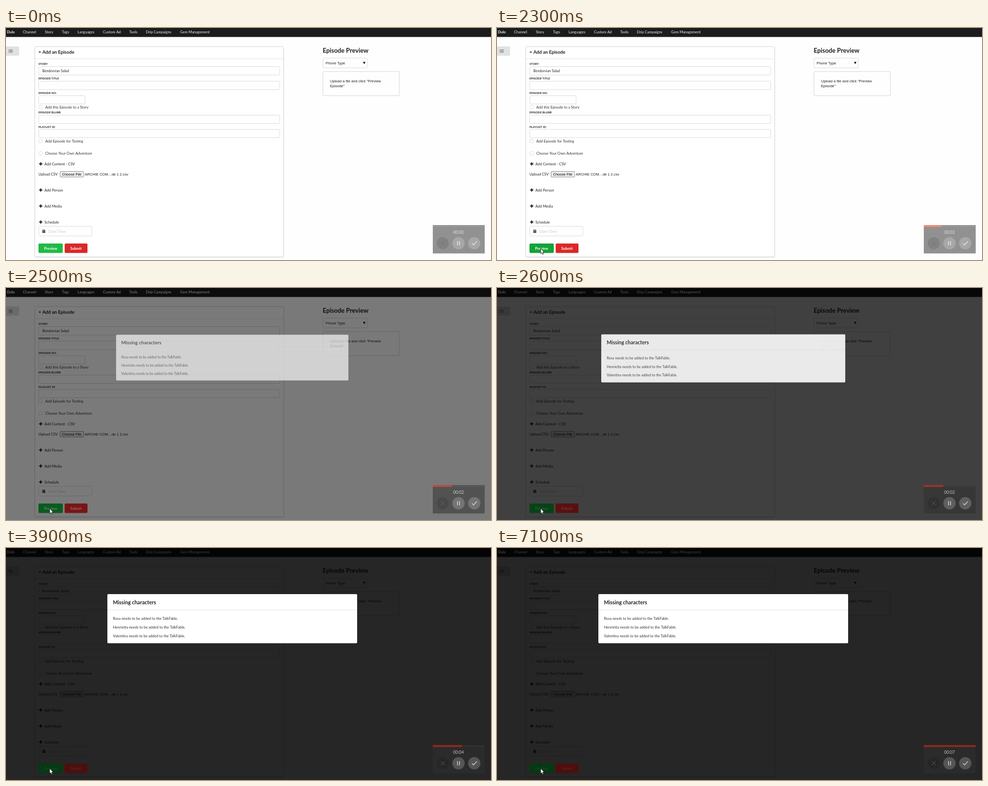
Recreate the animation shown at these times as an HTML page with a canvas. Size 1000 by 478 pixels, loop 7200 ms.

```html
<!DOCTYPE html>
<html lang="en">
<head>
<meta charset="utf-8">
<title>Add an Episode</title>
<style>
html, body { margin: 0; width: 100%; height: 100%; overflow: hidden; background: #fff; }
canvas { display: block; width: 100vw; height: 100vh; }
</style>
</head>
<body>
<canvas id="stage"></canvas>
<script>
const W = 1000, H = 478, LOOP = 7200, STEP = 100;
const LATO = 'Lato, sans-serif';
const ARIAL = '"Liberation Sans", Arial, sans-serif';
const INK = '#222', LINE = '#d9dadb', BASE = 7.52;

const canvas = document.getElementById('stage');
const ctx = canvas.getContext('2d');
const dpr = window.devicePixelRatio || 1;
canvas.width = W * dpr;
canvas.height = H * dpr;

// Piecewise linear value; keys are [time, value] pairs.
function track(keys, t) {
  if (t <= keys[0][0]) return keys[0][1];
  for (let i = 1; i < keys.length; i++) {
    const [t0, v0] = keys[i - 1], [t1, v1] = keys[i];
    if (t <= t1) return v0 + (v1 - v0) * (t - t0) / (t1 - t0);
  }
  return keys[keys.length - 1][1];
}

// cy is the middle of the capital letters.
function text(str, x, cy, { size = BASE, weight = 400, font = LATO, color = INK, align = 'left' } = {}) {
  ctx.font = `${weight} ${size}px ${font}`;
  ctx.fillStyle = color;
  ctx.textAlign = align;
  ctx.fillText(str, x, cy + size * 0.36);
}

function rect(x, y, w, h, color) {
  ctx.fillStyle = color;
  ctx.fillRect(x, y, w, h);
}

function box(x, y, w, h, { r = 2, fill, stroke } = {}) {
  ctx.beginPath();
  ctx.roundRect(x, y, w, h, r);
  if (fill) { ctx.fillStyle = fill; ctx.fill(); }
  if (stroke) { ctx.strokeStyle = stroke; ctx.lineWidth = 1; ctx.stroke(); }
}

function disc(x, y, r, fill) {
  ctx.beginPath();
  ctx.arc(x, y, r, 0, 7);
  ctx.fillStyle = fill;
  ctx.fill();
}

function lines(points, color, width) {
  ctx.beginPath();
  points.forEach(([x, y, move], i) => i && !move ? ctx.lineTo(x, y) : ctx.moveTo(x, y));
  ctx.strokeStyle = color;
  ctx.lineWidth = width;
  ctx.stroke();
}

const NAV = [['Channel', 35], ['Story', 80], ['Tags', 115.5], ['Languages', 147.5],
  ['Custom Ad', 200], ['Tools', 254], ['Drip Campaigns', 288.5], ['Gem Management', 359]];

function navText(color) {
  text('Dulo', 2, 8, { weight: 700, color });
  for (const [label, x] of NAV) text(label, x, 8, { color });
}

function buttons(hover) {
  box(67, 444, 50, 19.5, { fill: hover ? '#12a337' : '#21ba45' });
  box(121, 444, 47, 19.5, { fill: '#db2828' });
}

function radio(label, y) {
  ctx.beginPath();
  ctx.arc(71.2, y, 4, 0, 7);
  ctx.strokeStyle = '#d4d4d5';
  ctx.lineWidth = 0.8;
  ctx.stroke();
  text(label, 81, y + 0.3, { color: '#333' });
}

function plusRow(label, y) {
  rect(68.2, y - 1, 6.8, 1.9, '#111');
  rect(70.65, y - 3.4, 1.9, 6.8, '#111');
  text(label, 79.3, y + 0.2);
}

function field(label, labelY, y, w, h = 17.5) {
  text(label, 67, labelY, { size: 6, weight: 700 });
  box(67.5, y + 0.5, w, h, { stroke: LINE });
}

function form(hover) {
  ctx.save();
  ctx.shadowColor = 'rgba(34,36,38,.15)';
  ctx.shadowBlur = 2 * dpr;
  ctx.shadowOffsetY = dpr;
  box(59.5, 38.5, 513, 433, { fill: '#fff' });
  ctx.restore();
  box(59.5, 38.5, 513, 433, { stroke: '#d4d4d5' });
  rect(60, 63, 512, 1, '#e3e4e4');
  text('+ Add an Episode', 67, 49.3, { size: 9.6, weight: 700 });

  field('STORY', 74.3, 79, 497);
  text('Bendorvian Salad', 75, 88.3, { size: 7.2 });
  field('EPISODE TITLE', 104, 109, 497);
  field('EPISODE NO.', 133.8, 139, 95.5, 17);
  radio('Add this Episode to a Story', 163.2);
  field('EPISODE BLURB', 173.6, 179, 497, 17);
  field('PLAYLIST ID', 203.4, 208.5, 497, 17);
  radio('Add Episode for Testing', 233);
  radio('Choose Your Own Adventure', 258.2);

  plusRow('Add Content - CSV', 280);
  text('Upload CSV', 67, 301);
  box(111.5, 295.5, 48.5, 11.5, { r: 1, fill: '#efefef', stroke: '#8a8a8a' });
  text('Choose File', 115.5, 301, { size: 7.5, font: ARIAL, color: '#000' });
  text('ARCHIE COM…de 1 2.csv', 162.5, 301, { size: 7.5, font: ARIAL });
  plusRow('Add Person', 333.8);
  plusRow('Add Media', 366.8);
  plusRow('Schedule', 399.8);

  box(67.5, 408.5, 109.5, 20, { stroke: LINE });
  rect(74.7, 416.2, 6.4, 6, '#555');
  rect(74.7, 417.6, 6.4, 0.6, '#ccc');
  rect(75.8, 415, 1.2, 1.8, '#555');
  rect(78.8, 415, 1.2, 1.8, '#555');
  text('Date/Time', 87.5, 419.2, { color: '#c9c9c9' });

  buttons(hover);
  const label = { weight: 700, color: '#fff', align: 'center' };
  text('Preview', 92, 453.8, label);
  text('Submit', 144.3, 453.8, label);
}

function page(hover) {
  rect(0, 0, W, H, '#fefefe');
  rect(0, 0, W, 18.5, '#1b1c1d');
  navText('rgba(255,255,255,.95)');

  box(-4, 38, 31, 19, { fill: '#e0e1e2' });
  for (let y = 44.5; y < 51; y += 2.5) {
    rect(5.3, y, 1.4, 1.1, '#555');
    rect(7.5, y, 6, 1.1, '#666');
  }

  form(hover);

  text('Episode Preview', 653, 46, { size: 12.85, weight: 700 });
  box(653.5, 62, 91.5, 20, { stroke: LINE });
  const sans = { size: 7.55, font: ARIAL };
  text('Phone Type', 659, 72, sans);
  ctx.beginPath();
  ctx.moveTo(736, 69.8);
  ctx.lineTo(741.2, 69.8);
  ctx.lineTo(738.6, 74.4);
  ctx.fillStyle = '#111';
  ctx.fill();
  box(653.5, 89.8, 157.5, 49.6, { r: 1, stroke: '#d4d4d5' });
  text('Upload a file and click "Preview', 668, 109, sans);
  text('Episode"', 668, 119.5, sans);
}

const DIM = [[2300, 0], [2400, 0.25], [2500, 0.52], [2600, 0.75], [2700, 0.85]];
const FADE = [[2300, 0], [2400, 0.33], [2500, 0.66], [2600, 0.89], [2700, 1]];
const SCALE = [[2300, 0.8], [2400, 0.857], [2500, 0.93], [2600, 0.977], [2700, 1]];
const MIDDLE = [[2400, 141.7], [2600, 145], [2700, 145.6]];

function modal(t) {
  const s = track(SCALE, t);
  ctx.save();
  ctx.globalAlpha = track(FADE, t);
  ctx.translate(466.5, track(MIDDLE, t));
  ctx.scale(s, s);
  ctx.translate(-466.5, -145.6);
  box(209, 95, 515, 101.3, { fill: '#fff' });
  rect(209, 127, 515, 0.8, '#dcdcdd');
  text('Missing characters', 220.5, 111.8, { size: 10.74, weight: 700 });
  ['Rosa', 'Henrietta', 'Valentina'].forEach((name, i) =>
    text(`${name} needs to be added to the TalkFable.`, 220.5, 145 + i * 17.9, { color: '#333' }));
  ctx.restore();
}

function recorder(t) {
  const done = Math.min(107, t * 0.0155);
  rect(880 + done, 406, 107 - done, 4, 'rgba(58,58,58,.525)');
  rect(880, 406, done, 4, 'rgba(229,45,13,.55)');
  rect(880, 410, 107, 54.5, 'rgba(48,48,48,.525)');

  const white = 'rgba(255,255,255,.72)';
  const seconds = Math.floor((t + 100) / 1000);
  text('00:0' + seconds, 933, 421.3, { size: 8.6, color: white, align: 'center' });

  disc(900.5, 443.5, 12.5, 'rgba(0,0,0,.1)');
  lines([[896.5, 439.5], [904.5, 447.5], [904.5, 439.5, true], [896.5, 447.5]], 'rgba(110,110,110,.8)', 1);
  disc(933, 443.5, 12.7, 'rgba(255,255,255,.2)');
  rect(930.2, 439.2, 1.5, 8.6, white);
  rect(934.4, 439.2, 1.5, 8.6, white);
  disc(965.5, 443.5, 12.7, 'rgba(255,255,255,.2)');
  lines([[960.8, 443.8], [964, 447], [970.8, 439.8]], white, 1.5);
}

const ARROW = [[0, 0], [0, 11], [2.4, 8.8], [4, 12.6], [5.8, 11.8], [4.2, 8.1], [7.4, 8.1]];

function cursor(x, y) {
  ctx.beginPath();
  ARROW.forEach(([dx, dy]) => ctx.lineTo(x + dx, y + dy));
  ctx.closePath();
  ctx.fillStyle = '#fff';
  ctx.fill();
  ctx.strokeStyle = '#000';
  ctx.lineWidth = 0.8;
  ctx.stroke();
}

const CURSOR_X = [[800, 150], [1200, 92], [1500, 90]];
const CURSOR_Y = [[800, 420], [1200, 457], [1500, 454]];

function draw(t) {
  ctx.setTransform(dpr, 0, 0, dpr, 0, 0);
  const x = track(CURSOR_X, t), y = track(CURSOR_Y, t);
  const hover = t >= 800 && x < 117 && y > 444;
  page(hover);

  const dim = track(DIM, t);
  if (dim > 0) {
    rect(0, 0, W, H, `rgba(0,0,0,${dim})`);
    // Bar labels and buttons stay a little brighter than the page.
    navText(`rgba(255,255,255,${dim * 0.15})`);
    ctx.globalAlpha = dim * 0.28;
    buttons(hover);
    ctx.globalAlpha = 1;
    modal(t);
  }
  recorder(t);
  if (t >= 800) cursor(x, y);
}

function tick() {
  const t = performance.now() % LOOP;
  draw(Math.floor(t / STEP) * STEP);
  requestAnimationFrame(tick);
}
tick();
</script>
</body>
</html>
```
